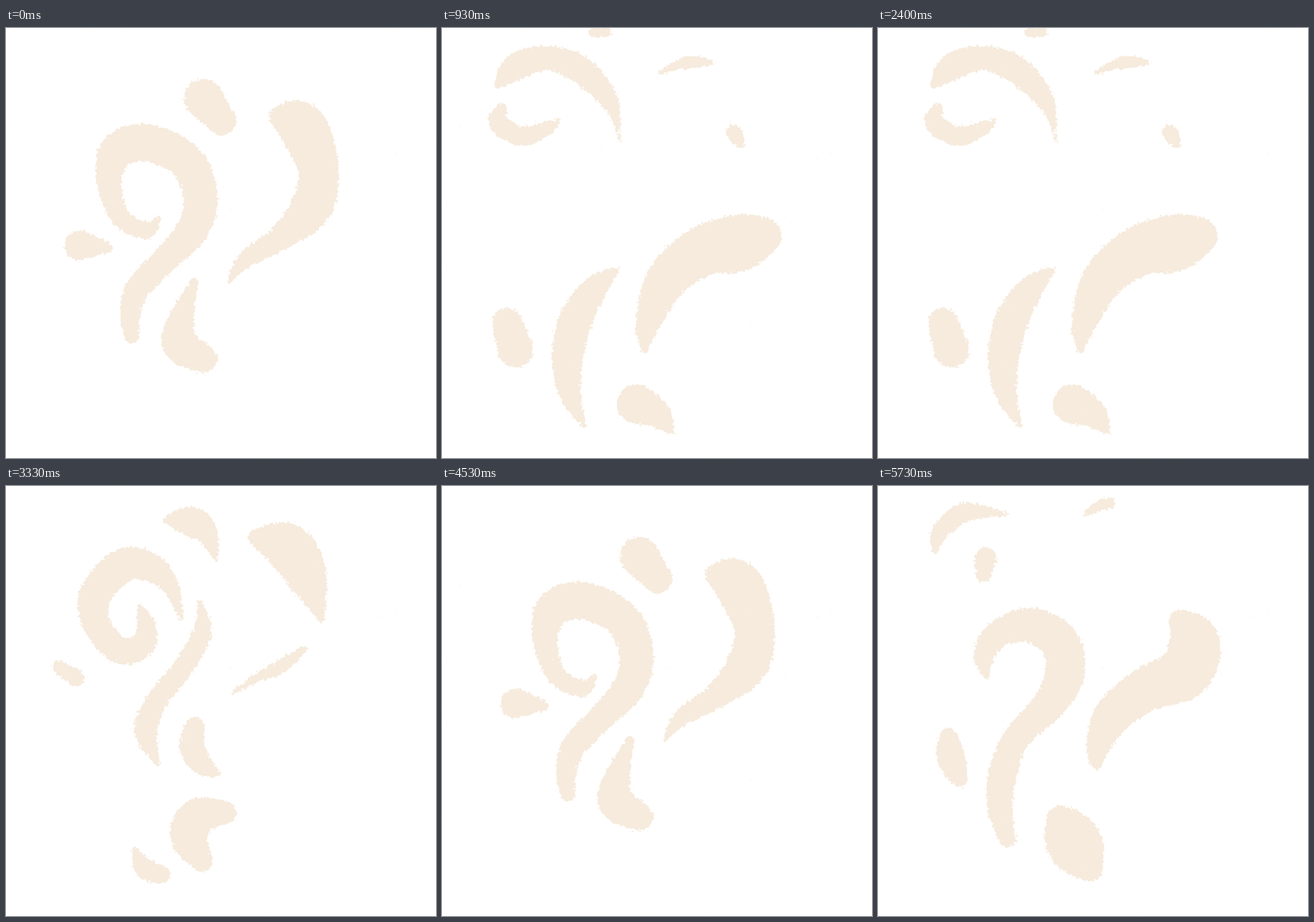
Write an HTML page that moves like this. It is 748 px wide and 748 px high and loops after 5.99 s.

```html
<!DOCTYPE html>
<html lang="en">
<head>
<meta charset="utf-8">
<title>Brush swirls</title>
<style>
  html, body { margin: 0; height: 100%; overflow: hidden; background: #fff; }
  svg { display: block; width: 100%; height: 100%; }
</style>
</head>
<body>
<svg viewBox="0 0 748 748">
  <!-- Dry brush edge: soften the outline, add grain, cut at a threshold. -->
  <filter id="dry" filterUnits="userSpaceOnUse" x="-20" y="-20" width="788" height="788"
          color-interpolation-filters="sRGB">
    <feGaussianBlur in="SourceGraphic" stdDeviation="3" result="soft"/>
    <feTurbulence type="fractalNoise" baseFrequency=".2" numOctaves="3" seed="4" result="grain"/>
    <feComposite in="soft" in2="grain" operator="arithmetic" k2=".5" k3=".65" k4="-.075"/>
    <feComponentTransfer result="mask"><feFuncA type="linear" slope="14" intercept="-6.5"/></feComponentTransfer>
    <feFlood flood-color="#f6ebdd"/>
    <feComposite in2="mask" operator="in"/>
  </filter>
  <g filter="url(#dry)"><path id="paint" fill="#f6ebdd"/></g>
</svg>
<script>
const SAMPLES = 20;

function circle(x, y, radius) {
  const r = Math.max(radius, 0.5);
  return `M${x - r} ${y}a${r} ${r} 0 1 0 ${2 * r} 0a${r} ${r} 0 1 0 ${-2 * r} 0`;
}

const catmullRom = (a, b, c, d, t) =>
  b + t / 2 * (c - a + t * (2 * a - 5 * b + 4 * c - d + t * (3 * (b - c) + d - a)));

// A round brush dragged through knots "x y radius".
function brush(...values) {
  const last = values.length / 3 - 1;
  const knot = i => {
    const k = 3 * Math.min(Math.max(i, 0), last);
    return values.slice(k, k + 3);
  };
  let path = '';
  for (let s = 0; s <= last * SAMPLES; s++) {
    const i = Math.floor(s / SAMPLES);
    const [a, b, c, d] = [i - 1, i, i + 1, i + 2].map(knot);
    path += circle(...b.map((v, k) => catmullRom(a[k], v, c[k], d[k], s / SAMPLES - i)));
  }
  return path;
}

function curled() {
  const swirl = brush(264,332,5, 245,352,14, 200,330,17, 180,270,21, 192,215,30, 245,200,33,
    312,230,31, 338,290,30, 326,348,28, 278,402,23, 228,455,21, 216,505,17, 219,537,12);
  const petal = brush(476,155,18, 515,172,42, 543,245,35, 532,310,36, 480,363,22, 415,405,14, 386,445,2);
  const drop = brush(343,122,34, 376,162,25);
  const seed = brush(128,378,26, 178,382,8);
  const root = brush(327,443,8, 307,500,20, 302,548,31, 342,575,25);
  return swirl + petal + drop + seed + root;
}

function split() {
  const swirl = brush(305,232,3, 286,174,15, 252,142,25, 204,138,29, 155,190,28, 159,243,24,
    198,286,23, 238,277,21, 244,243,16, 233,210,5);
  const tail = brush(337,200,4, 341,255,16, 305,320,18, 265,370,18, 243,425,20, 264,484,4);
  const petal = brush(436,90,15, 490,106,41, 522,155,35, 549,235,4);
  const sliver = brush(518,284,6, 478,314,12, 440,332,8, 394,360,3);
  const drop = brush(275,60,4, 322,62,26, 350,84,18, 366,130,3);
  const seed = brush(92,315,12, 122,334,15);
  const root = brush(328,420,18, 324,455,22, 342,485,18, 372,502,3);
  const kidney = brush(382,568,19, 335,574,32, 318,610,32, 340,652,19);
  const sprout = brush(223,630,3, 240,664,17, 270,676,16);
  return swirl + tail + petal + sliver + drop + seed + root + kidney + sprout;
}

function loosened() {
  const swirl = brush(305,220,3, 280,150,16, 240,105,22, 180,95,25, 126,135,25, 130,195,22,
    180,238,20, 226,222,12);
  const tail = brush(320,245,10, 285,310,14, 260,365,4);
  const petal = brush(410,80,8, 480,85,25, 525,125,20, 544,200,4);
  const wave = brush(545,330,16, 470,368,25, 405,405,22, 370,485,5);
  const drop = brush(270,40,5, 300,44,22, 330,62,6);
  const seed = brush(113,585,22, 128,615,22);
  const crescent = brush(330,525,16, 262,590,28, 230,650,20, 246,690,3);
  const sprout = brush(340,708,18, 375,735,4);
  return swirl + tail + petal + wave + drop + seed + crescent + sprout;
}

function broken() {
  const arch = brush(96,102,5, 128,68,23, 182,52,21, 240,72,24, 287,120,17, 304,165,6, 309,200,2);
  const comma = brush(104,140,9, 98,165,17, 138,188,17, 180,176,12, 205,160,3);
  const wave = brush(353,562,5, 358,515,21, 391,438,36, 450,390,43, 515,374,49, 558,362,33);
  const crescent = brush(304,420,5, 267,452,21, 232,510,29, 218,580,26, 224,640,18, 248,694,3);
  const drop = brush(262,8,8, 286,7,9);
  const petal = brush(378,79,3, 410,65,8, 435,59,11, 474,61,3);
  const fleck = brush(508,182,14, 518,200,9);
  const seed = brush(113,513,26, 128,560,31);
  const root = brush(338,654,34, 375,672,23, 402,706,3);
  return arch + comma + wave + crescent + drop + petal + fleck + seed + root;
}

function rising() {
  const hook = brush(190,333,4, 184,296,18, 208,258,23, 265,242,30, 318,275,34, 324,330,34,
    295,383,28, 240,440,23, 216,505,25, 213,565,21, 226,615,14);
  const wave = brush(522,230,15, 550,270,43, 533,325,46, 465,354,38, 408,400,33, 384,450,21, 380,485,9);
  const arch = brush(98,116,4, 107,82,14, 140,50,17, 172,44,13, 228,50,2);
  const comma = brush(187,125,19, 184,155,13);
  const petal = brush(360,49,4, 388,33,10, 405,30,9);
  const seed = brush(122,435,15, 127,472,25, 142,510,14);
  const root = brush(318,582,26, 342,622,48, 368,665,23);
  return hook + wave + arch + comma + petal + seed + root;
}

const poses = [curled, split, loosened, broken, rising].map(pose => pose());
const paint = document.getElementById('paint');
const LOOP = 5990;
let shown = -1;

// Poses are held for 330 ms and 270 ms in turn.
function draw() {
  const t = performance.now() % LOOP;
  const step = 2 * Math.floor(t / 600) + (t % 600 >= 330 ? 1 : 0);
  const pose = step % poses.length;
  if (pose !== shown) paint.setAttribute('d', poses[shown = pose]);
  requestAnimationFrame(draw);
}
draw();
</script>
</body>
</html>
```
